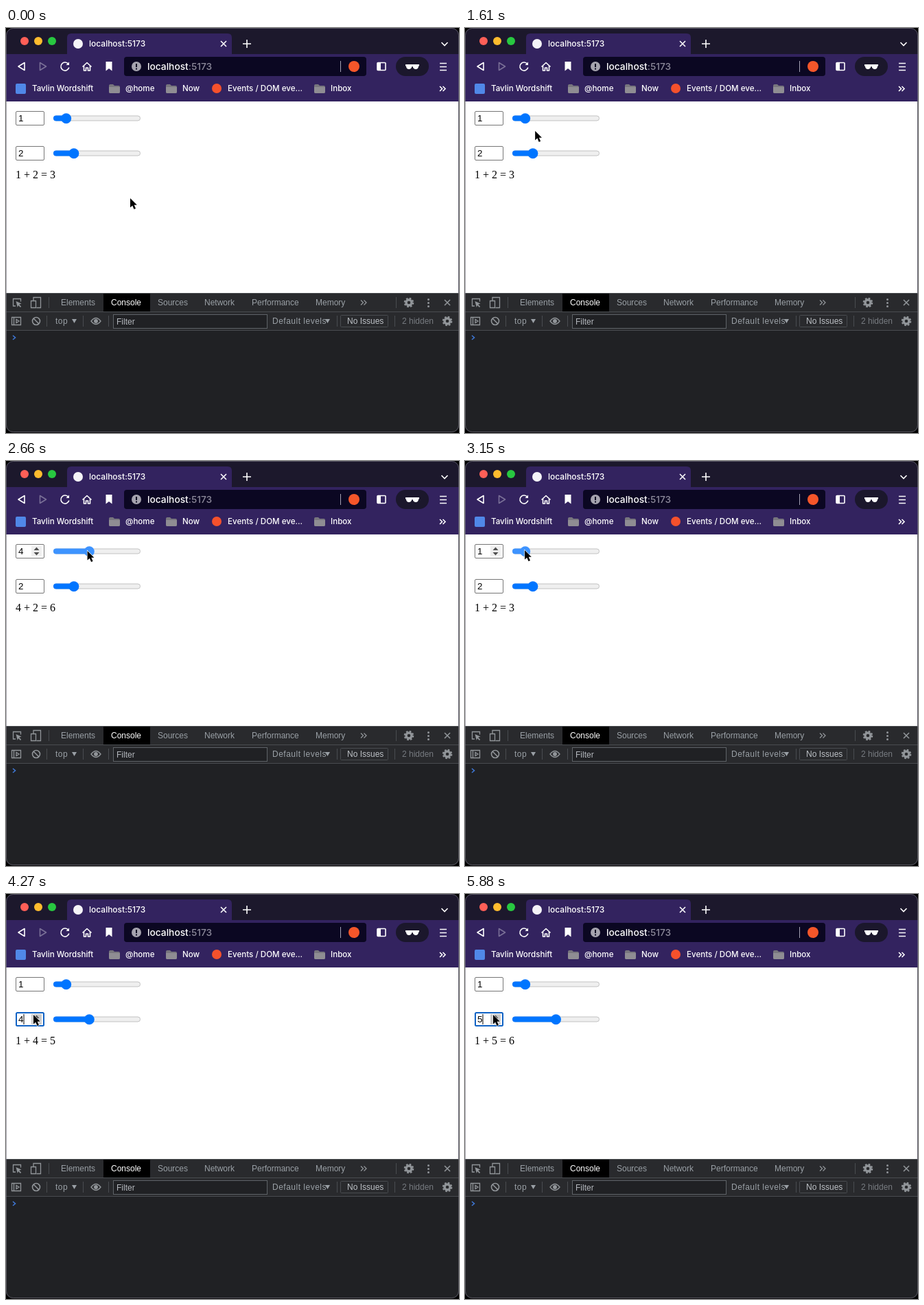
Recreate the animation shown at these times as an HTML page. Size 660 by 590 pixels, loop 5950 ms.

```html
<!DOCTYPE html>
<html lang="en">
<head>
<meta charset="utf-8">
<title>Adding two numbers</title>
<style>
  html, body { margin: 0; width: 100%; height: 100%; overflow: hidden; background: #000; }
  svg { display: block; width: 660px; height: 590px; }
  text { white-space: pre; }
  .ui { font: 500 11.6px Inter, sans-serif; fill: #fff; }
  .tools { font: 12px "Liberation Sans", Arial, sans-serif; fill: #9aa0a6; }
  .wide { letter-spacing: .5px; }
  .field { font: 13.33px "Liberation Sans", Arial, sans-serif; }
  .sum { font: 16px "Liberation Serif", Times, serif; }
  .line { fill: none; stroke: #fff; stroke-width: 1.6; }
  .icon { fill: none; stroke: #919599; stroke-width: 1.3; }
  .rule { stroke: #494c50; fill: none; }
</style>
</head>
<body>
<svg viewBox="0 0 660 590">
  <defs>
    <clipPath id="window"><rect width="660" height="589" rx="10"/></clipPath>
    <g id="folder">
      <path d="M0 2q0-2 2-2h4l2 2h6q2 0 2 2v7q0 2-2 2H2q-2 0-2-2z" fill="#77757d"/>
      <path d="M0 4h16v7q0 2-2 2H2q-2 0-2-2z" fill="#8f8d93"/>
    </g>
    <g id="gear" fill="none" stroke="#919599">
      <circle r="4" stroke-width="3.4"/>
      <circle r="6.2" stroke-width="2.2" stroke-dasharray="2.6 2.27"/>
    </g>
    <path id="more" d="M0 0l3.5 3.5L0 7M4.5 0L8 3.5 4.5 7"/>
    <path id="cross" d="M-4-4L4 4M4-4L-4 4"/>
    <path id="down" d="M0 0h7l-3.5 6z" fill="#9aa0a6"/>
  </defs>

  <g clip-path="url(#window)">
    <rect width="660" height="590" fill="#1c182c"/>

    <!-- tab strip -->
    <circle cx="27" cy="19" r="6" fill="#ff5f57"/>
    <circle cx="47" cy="19" r="6" fill="#febc2e"/>
    <circle cx="67" cy="19" r="6" fill="#28c840"/>
    <path d="M0 38H89V14q0-6 6-6H323q6 0 6 6V38H660V107H0z" fill="#33235f"/>
    <circle cx="105" cy="23" r="7" fill="#f4f3f7"/>
    <text class="ui" x="121" y="27" style="font-size:12px">localhost:5173</text>
    <use href="#cross" class="line" x="317" y="23"/>
    <path class="line" stroke-width="2" d="M345 23h12M351 17v12M634.500 21l4.500 4.500 4.500-4.500"/>

    <!-- toolbar -->
    <g class="line" stroke-linejoin="round">
      <path d="M27 50.500v11l-9-5.500z"/>
      <path d="M49.500 50.500v11l9-5.500z" stroke="#fff" stroke-opacity=".35"/>
      <path d="M90.800 52.500a6 6 0 1 0 1 5"/>
      <path d="M92 49.500v4.500h-4.500z" fill="#fff" stroke="none"/>
      <path d="M111.500 56.500l6.500-6 6.500 6M113.500 55v7h3v-4h3v4h3v-7"/>
      <path d="M145.500 49h9v13.500l-4.500-3.500-4.500 3.500z" fill="#fff" stroke="none"/>
    </g>
    <rect x="172" y="42" width="353" height="28" rx="4" fill="#0b0722"/>
    <circle cx="190" cy="56" r="7" fill="#a5a3ae"/>
    <path d="M190 52v5M190 58.500v2" stroke="#0b0722" stroke-width="2"/>
    <text class="ui" x="206" y="61" style="font-size:13.75px">localhost<tspan fill="#8d8a9b">:5173</tspan></text>
    <path d="M487.500 48v16" stroke="#a5a3b5"/>
    <circle cx="507" cy="56" r="8" fill="#f4562a"/>
    <rect class="line" x="541" y="50.500" width="12" height="11" rx="1"/>
    <path d="M541 50.500h5v11h-5z" fill="#fff"/>
    <rect x="568" y="42" width="48" height="28" rx="14" fill="#1b172c"/>
    <path d="M582 53h20v2l-1 1q-.5 4-4 4-3.500 0-4.500-4h-1q-1 4-4.500 4-3.500 0-4-4l-1-1z" fill="#fff"/>
    <path class="line" d="M632 51.500h10M632 56.500h10M632 61.500h10"/>

    <!-- bookmarks -->
    <rect x="14" y="81" width="15" height="15" rx="2" fill="#5088e8"/>
    <text class="ui" x="38" y="92">Tavlin Wordshift</text>
    <use href="#folder" x="150" y="82"/>
    <text class="ui" x="174" y="92">@home</text>
    <use href="#folder" x="233" y="82"/>
    <text class="ui" x="257" y="92">Now</text>
    <circle cx="307" cy="88" r="7" fill="#f5512c"/>
    <text class="ui" x="323" y="92">Events / DOM eve...</text>
    <use href="#folder" x="449" y="82"/>
    <text class="ui" x="473" y="92">Inbox</text>
    <use href="#more" class="line" x="632" y="85"/>

    <!-- page -->
    <rect y="107" width="659" height="279" fill="#fff"/>
    <g id="rows"></g>
    <text class="sum" id="sum" x="14" y="219"></text>

    <!-- developer tools -->
    <rect y="386" width="660" height="55" fill="#292a2d"/>
    <rect y="441" width="660" height="149" fill="#202124"/>
    <rect x="142" y="387" width="68" height="26" fill="#000"/>
    <path class="rule" d="M0 386.500H660M0 413.500H660M0 440.500H660M62.500 392v16M568.500 392v16M59.500 419v16M112.500 419v16M149.500 419v16M482.500 419v16M566.500 419v16"/>
    <g class="tools">
      <text x="80" y="404">Elements</text>
      <text x="153" y="404" fill="#fff" style="fill:#fff">Console</text>
      <text x="221" y="404">Sources</text>
      <text x="289" y="404">Network</text>
      <text x="358" y="404">Performance</text>
      <text x="451" y="404">Memory</text>
      <text x="72" y="431" class="wide">top</text>
      <text x="388" y="431" class="wide">Default levels</text>
      <text x="577" y="431" style="fill:#777b80">2 hidden</text>
    </g>
    <g class="icon">
      <path d="M14 405h-3.500v-10.500h11v4"/>
      <path d="M14.500 398l8 3.500-3.300 1.200 3 3-1.200 1.200-3-3-1.200 3z" fill="#919599" stroke="none"/>
      <path d="M40 397v-4.500h10.500v15h-6M36.500 397.500h7v10h-7z"/>
      <use href="#more" x="517" y="396.500"/>
      <use href="#cross" x="643" y="400" stroke-width="1.600"/>
      <path d="M8.500 421.500h13v11h-13zM11.500 421.500v11M15 424.500l4 2.500-4 2.500z"/>
      <g stroke-width="1.600"><circle cx="44" cy="427" r="5.500"/><path d="M40 423l8 8"/></g>
      <path d="M124 427q7-9 14 0-7 9-14 0z"/>
      <circle cx="131" cy="427" r="2.300" fill="#919599"/>
    </g>
    <g fill="#919599"><circle cx="615.500" cy="395.500" r="1.500"/><circle cx="615.500" cy="400.500" r="1.500"/><circle cx="615.500" cy="405.500" r="1.500"/></g>
    <use href="#gear" x="587" y="400"/>
    <use href="#gear" x="643" y="427"/>
    <use href="#down" x="96" y="424"/>
    <use href="#down" x="465" y="424"/>
    <rect x="156.500" y="417.500" width="224" height="20" fill="#202124" stroke="#5f6368"/>
    <text class="tools" x="161" y="432" style="fill:#b5b9be">Filter</text>
    <rect x="487.500" y="418.500" width="69" height="17" rx="1" class="rule"/>
    <text class="tools" x="497" y="431" style="fill:#bdc1c6">No Issues</text>
    <path d="M10 448l3.500 3-3.500 3" fill="none" stroke="#3f78d6" stroke-width="1.600"/>
  </g>
  <rect x=".5" y=".5" width="659" height="588" rx="10" fill="none" stroke="#777580" stroke-opacity=".65"/>
  <path id="cursor" d="M0 0V13.500L3.200 10.700 5.500 16 8 15 5.700 9.800H9.800Z" stroke="#fff" stroke-width="1.200" paint-order="stroke"/>
</svg>
<script>
const LOOP = 5950, STEP = 70;
const $ = id => document.getElementById(id);

// pointer stops: time, x, y
const stops = [
  [0, 181, 248], [1200, 181, 248], [1750, 87, 131], [1950, 87, 131],
  [2240, 97, 131], [2600, 120, 131], [3080, 87, 130], [3220, 87, 130],
  [3700, 40, 176], [4500, 40, 176], [4600, 41, 176], [LOOP, 41, 176]
];
const clicks = [3990, 4270, 4500];

function pointer(t) {
  const i = stops.findIndex(s => s[0] > t);
  const [t0, x0, y0] = stops[i - 1], [t1, x1, y1] = stops[i];
  const p = (t - t0) / (t1 - t0), e = p * p * (3 - 2 * p);
  return [x0 + (x1 - x0) * e, y0 + (y1 - y0) * e];
}

function row(top, value, [px, py], dragging, focused, caret) {
  const mid = top + 10.5, knob = 76.5 + 11.2 * value;
  const over = dragging || px >= 14 && px <= 198 && py >= top && py <= top + 21;
  const blue = dragging || over && px > 68 ? '#3d93ff' : '#0075ff';
  const border = focused ? 'stroke="#1062c4" stroke-width="2"' : 'stroke="#767676"';
  const inset = focused ? 1 : .5;
  const shade = px > 36 && px < 54 ? '#c9c9c9' : '#efefef';
  const spinner = `<rect x="37" y="${top + 3}" width="15" height="15" fill="${shade}"/>
    <path d="M40.500 ${mid - 1.5}l4-4.500 4 4.500zM40.500 ${mid + 1.5}l4 4.500 4-4.500z" fill="#505050"/>`;
  return `<rect x="${14 + inset}" y="${top + inset}" width="${42 - 2 * inset}" height="${21 - 2 * inset}" rx="1.500" fill="#fff" ${border}/>
    <text class="field" x="18" y="${top + 15}">${value}</text>
    ${over ? spinner : ''}
    ${caret ? `<path d="M26 ${top + 3}v15" stroke="#000"/>` : ''}
    <rect x="69.500" y="${mid - 3.5}" width="126" height="7" rx="3.500" fill="#efefef" stroke="#c2c2c2"/>
    <rect x="69" y="${mid - 4}" width="${knob - 69}" height="8" rx="4" fill="${blue}"/>
    <circle cx="${knob}" cy="${mid + .3}" r="7.500" fill="${blue}"/>`;
}

function draw(now) {
  const t = Math.floor(now % LOOP / STEP) * STEP;
  const at = pointer(t), dragging = t >= 1850 && t < 3200;
  const a = dragging ? Math.round((at[0] - 76.5) / 11.2) : 1;
  const b = 2 + clicks.filter(c => c <= t).length;
  const focused = t >= clicks[0];
  const last = clicks.filter(c => c <= t).pop();
  const caret = focused && (t - last) % 1000 < 500;
  $('rows').innerHTML = row(121, a, at, dragging, false, false) + row(172, b, at, false, focused, caret);
  $('sum').textContent = `${a} + ${b} = ${a + b}`;
  $('cursor').setAttribute('transform', `translate(${at})`);
  requestAnimationFrame(draw);
}
requestAnimationFrame(draw);
</script>
</body>
</html>
```
